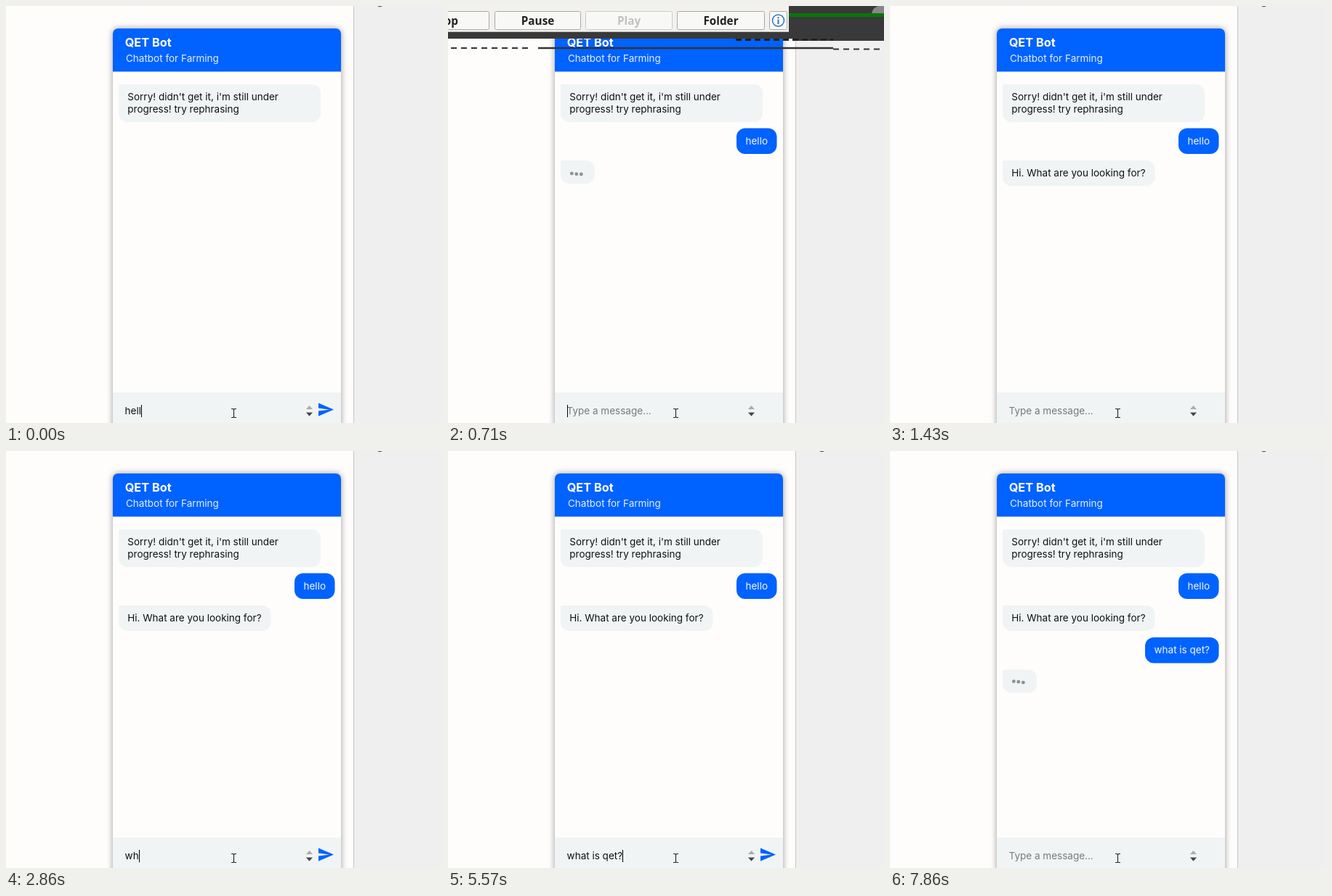
Write an HTML page with a canvas that moves like this. It is 600 px wide and 575 px high and loops after 8 s.

```html
<!DOCTYPE html>
<html lang="en">
<head>
<meta charset="utf-8">
<title>Chat demo</title>
<style>
  html, body { margin: 0; width: 100%; height: 100%; overflow: hidden; background: #fefdfc; }
  canvas { display: block; }
</style>
</head>
<body>
<canvas id="stage" width="600" height="575"></canvas>
<script>
const ctx = document.getElementById('stage').getContext('2d');
const LOOP = 8000, FPS = 7;
const BLUE = '#0062ff', PALE = '#f0f4f5', PAGE = '#fefdfc';
const BODY_FONT = '13.5px Inter, sans-serif';
const SENT = [450, 5650];

// Contents of the input field from each time on
const typed = [
  [0, 'hell'], [140, 'hello'], [430, ''],
  [2710, 'w'], [2860, 'wh'], [3000, 'wha'], [3140, 'what'], [3430, 'what '],
  [4000, 'what is'], [4140, 'what is '], [4710, 'what is q'], [4860, 'what is qe'],
  [5140, 'what is qet'], [5570, 'what is qet?'], [5710, '']
];

function rect(x, y, w, h, color) {
  ctx.fillStyle = color;
  ctx.fillRect(x, y, w, h);
}

function rounded(x, y, w, h, radii, color) {
  ctx.fillStyle = color;
  ctx.beginPath();
  ctx.roundRect(x, y, w, h, radii);
  ctx.fill();
}

function shape(path, color) {
  ctx.fillStyle = color;
  ctx.fill(new Path2D(path));
}

function line(path, color, width, dash = []) {
  ctx.strokeStyle = color;
  ctx.lineWidth = width;
  ctx.setLineDash(dash);
  ctx.stroke(new Path2D(path));
  ctx.setLineDash([]);
}

function text(str, x, y, color, font = BODY_FONT, align = 'left') {
  ctx.font = font;
  ctx.fillStyle = color;
  ctx.textAlign = align;
  ctx.fillText(str, x, y);
}

function textWidth(str) {
  ctx.font = BODY_FONT;
  return ctx.measureText(str).width;
}

function botMessage(y, width, ...lines) {
  rounded(155, y, width, 18 + 17 * lines.length, [2, 12, 12, 12], PALE);
  lines.forEach((str, i) => text(str, 167.3, y + 22 + 17 * i, '#111'));
}

function userMessage(y, str) {
  const width = textWidth(str) + 25;
  rounded(452.5 - width, y, width, 35.5, 12, BLUE);
  text(str, 465 - width, y + 22, '#f4f8ff');
}

function typingDots(y, age) {
  rounded(155, y, 47, 32, [2, 12, 12, 12], PALE);
  for (let i = 0; i < 3; i++) {
    const phase = age / 1570 + 0.07 - i * 0.1;
    ctx.fillStyle = '#8f9294';
    ctx.beginPath();
    ctx.arc(170.3 + i * 6.5, y + 17.5 + 1.5 * Math.cos(2 * Math.PI * phase), 2.4, 0, 7);
    ctx.fill();
  }
}

function page() {
  rect(0, 0, 600, 575, PAGE);
  rect(479, 0, 121, 575, '#f0efef');
  rect(478, 0, 1, 575, '#c8c7c7');
  line('M511 -1Q514.500 2 518 -1', '#555', 1.5);

  ctx.save();
  ctx.shadowColor = 'rgba(0,0,0,.4)';
  ctx.shadowBlur = 8;
  rounded(147, 31, 314, 560, 7, PAGE);
  ctx.restore();
  rounded(147, 31, 314, 59.5, [7, 7, 0, 0], BLUE);
  text('QET Bot', 163.7, 56, '#fff', 'bold 16.3px Inter, sans-serif');
  text('Chatbot for Farming', 165, 77, '#e6efff');
}

function inputBar(t) {
  const value = typed.findLast(([start]) => start <= t + 5)[1];
  rect(147, 533, 314, 42, PALE);
  text(value || 'Type a message...', 163.6, 563, value ? '#111' : '#777a7c');

  const sentAt = SENT[t < SENT[1] ? 0 : 1];
  if (value || (t - sentAt) % 1200 < 600) {
    rect(Math.round(163.5 + textWidth(value)), 550, 1, 17, '#000');
  }

  shape('M413 556L417.500 551L422 556Z', '#aaabab');
  shape('M413 560.500L417.500 565.500L422 560.500Z', '#444');
  if (value) {
    ctx.save();
    ctx.translate(428, 544.5);
    shape('M2 21L23 12L2 3V10L17 12L2 14Z', BLUE);
    ctx.restore();
  }

  const beam = 'M310 555.500H312.500L313.500 556.500L314.500 555.500H317' +
    'M313.500 556V567M310 567.500H312.500L313.500 566.500L314.500 567.500H317';
  line(beam, '#fff', 3);
  line(beam, '#222', 1.2);
}

function button(x, width, label, enabled = true) {
  ctx.beginPath();
  ctx.roundRect(x + 0.5, 7.5, width - 1, 25, 2);
  ctx.fillStyle = '#f8f8f7';
  ctx.fill();
  ctx.strokeStyle = enabled ? '#aaa9a7' : '#cccbc9';
  ctx.lineWidth = 1;
  ctx.stroke();
  text(label, x + width / 2, 26, enabled ? '#222' : '#c2c2c2',
    'bold 15.3px "Noto Sans", sans-serif', 'center');
}

function recorderFlash() {
  rect(0, 0, 600, 45, '#393939');
  rect(469, 10, 131, 5, '#087508');
  shape('M583 10Q585 2 592 0H600V10Z', '#888');
  rect(0, 0, 469, 36, '#f2f1f0');
  rect(0, 35, 469, 1, '#bbb');
  button(-61, 118, '');
  text('op', 14, 26, '#222', 'bold 15.3px "Noto Sans", sans-serif', 'right');
  button(64, 119, 'Pause');
  button(189, 120, 'Play', false);
  button(315, 121, 'Folder');
  button(442, 25, '');
  ctx.beginPath();
  ctx.arc(454.5, 20, 8, 0, 7);
  ctx.strokeStyle = '#2f72c4';
  ctx.lineWidth = 1.5;
  ctx.stroke();
  rect(453.5, 15, 2, 2, '#2f72c4');
  rect(453.5, 18.5, 2, 6.5, '#2f72c4');

  rect(479, 45, 121, 3, '#393939');
  line('M396 46.500H530', '#222', 3, [8, 5]);
  line('M4 58H112M530 59.500H600', '#333', 2, [8, 6]);
  line('M124 58H530', '#333', 2.5);
}

function draw(t) {
  page();
  botMessage(108, 278, "Sorry! didn't get it, i'm still under", 'progress! try rephrasing');
  if (t >= 425) userMessage(168.5, 'hello');
  if (t >= 1280) botMessage(213, 209.5, 'Hi. What are you looking for?');
  else if (t >= 565) typingDots(213, t - 500);
  if (t >= 5705) userMessage(257, 'what is qet?');
  if (t >= 5850) typingDots(301.5, t - 5720);
  inputBar(t);
  if (t >= 705 && t < 850) recorderFlash();
}

function tick() {
  const now = performance.now() % LOOP;
  const step = Math.floor((now + 5) * FPS / 1000);
  draw(step * 1000 / FPS);
  requestAnimationFrame(tick);
}
tick();
</script>
</body>
</html>
```
